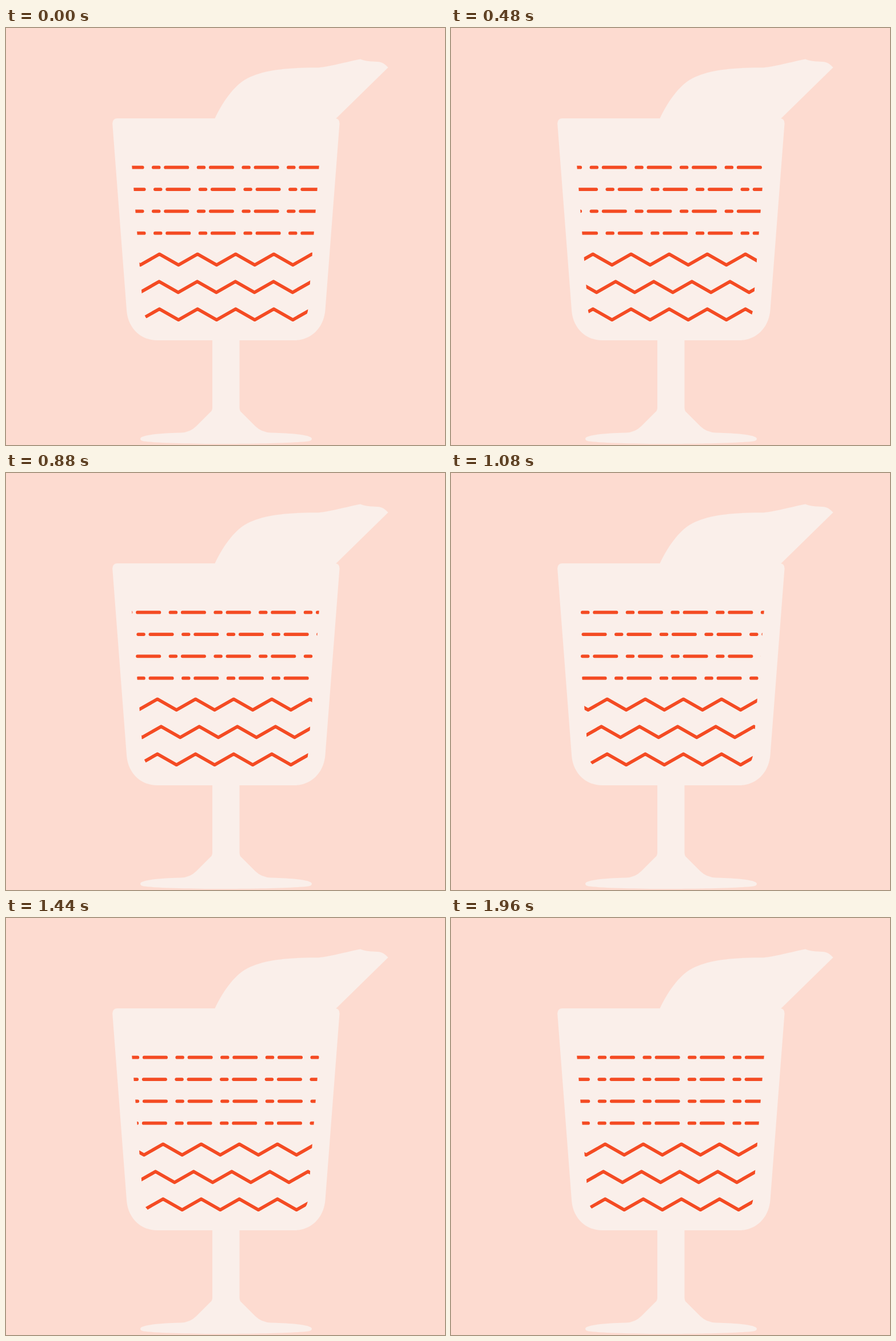
An HTML page that plays this animation: 768 by 729 pixels, repeating every 2 s.

```html
<!DOCTYPE html>
<html lang="en">
<head>
<meta charset="utf-8">
<title>Glass</title>
<style>
  html, body { margin: 0; width: 100%; height: 100%; overflow: hidden; background: #fddbd0; }
  svg { display: block; width: 768px; height: 729px; }
  .glass { fill: #faefea; }
  .lines { fill: none; stroke: #f44b23; stroke-width: 5.8; stroke-linecap: round; stroke-linejoin: round; }
</style>
</head>
<body>
<svg viewBox="0 0 768 729">
  <defs>
    <clipPath id="inside">
      <path d="M218.8 222 H549.2 L528.5 490 A28 28 0 0 1 500.5 518 H267.5 A28 28 0 0 1 239.5 490 Z"/>
    </clipPath>
  </defs>
  <g class="glass">
    <path d="M365 159 C379 129 397 105 414 93 C440 75 485 69 543 69.3 C562 69 598 58.5 620 54.5
             C631 59 642 58.5 653 59.2 C660 60.5 665 65 668.5 69 L576.5 159 Z"/>
    <path d="M194 158 H576 Q583.5 158.5 583.5 167 L558.5 493 C556 524 534 546 504 546 H265
             C235 546 213 524 211 493 L186.2 167 Q186.500 158.500 194 158 Z"/>
    <path d="M361 545 H408.500 V664 Q408.500 669 412 672 L436 696 Q447 707 464 707.500
             C505 708.500 535 712 535 718 Q535 721.500 529 722.500 C475 728.500 295 728.500 241 722.500
             Q235 721.500 235 718 C235 712 265 708.500 306 707.500 Q322 707 333 696 L357 672 Q361 669 361 664 Z"/>
  </g>
  <g class="lines" id="lines" clip-path="url(#inside)"></g>
</svg>
<script>
const LOOP = 2000, STEP = 40;
const DASH = { period: 78.7, start: 256.5, offset: -1.5, speed: 51.43 };
const WAVE = { period: 66.7, start: 268.15, offset: 0.25, speed: -51.7, amp: 9.45 };
const LEFT = 200, RIGHT = 570;

const dashShape = (x, y) => `M${x + 2.9} ${y}h9.7M${x + 24.1} ${y}h38.3`;
const waveShape = (x, y) =>
  `${x < LEFT ? 'M' : 'L'}${x} ${y - WAVE.amp}L${x + WAVE.period / 2} ${y + WAVE.amp}`;

const rows = [];
function addRows(count, top, gap, kind, shape) {
  for (let i = 0; i < count; i++) {
    const path = document.createElementNS('http://www.w3.org/2000/svg', 'path');
    document.getElementById('lines').append(path);
    // Neighbouring rows run in opposite directions.
    rows.push({ path, y: top + i * gap, dir: i % 2 ? -1 : 1, kind, shape });
  }
}
addRows(4, 243.7, 38.33, DASH, dashShape);
addRows(3, 404.8, 47.95, WAVE, waveShape);

function draw(time) {
  const step = Math.floor((time % LOOP) / STEP);
  for (const { path, y, dir, kind, shape } of rows) {
    const { period, start, offset, speed } = kind;
    const shifted = start + dir * (offset + speed * step) - LEFT;
    let d = '';
    for (let x = LEFT + ((shifted % period) + period) % period - period; x < RIGHT; x += period) {
      d += shape(x, y);
    }
    path.setAttribute('d', d);
  }
}

const begin = performance.now();
function tick() {
  draw(performance.now() - begin);
  requestAnimationFrame(tick);
}
tick();
</script>
</body>
</html>
```
